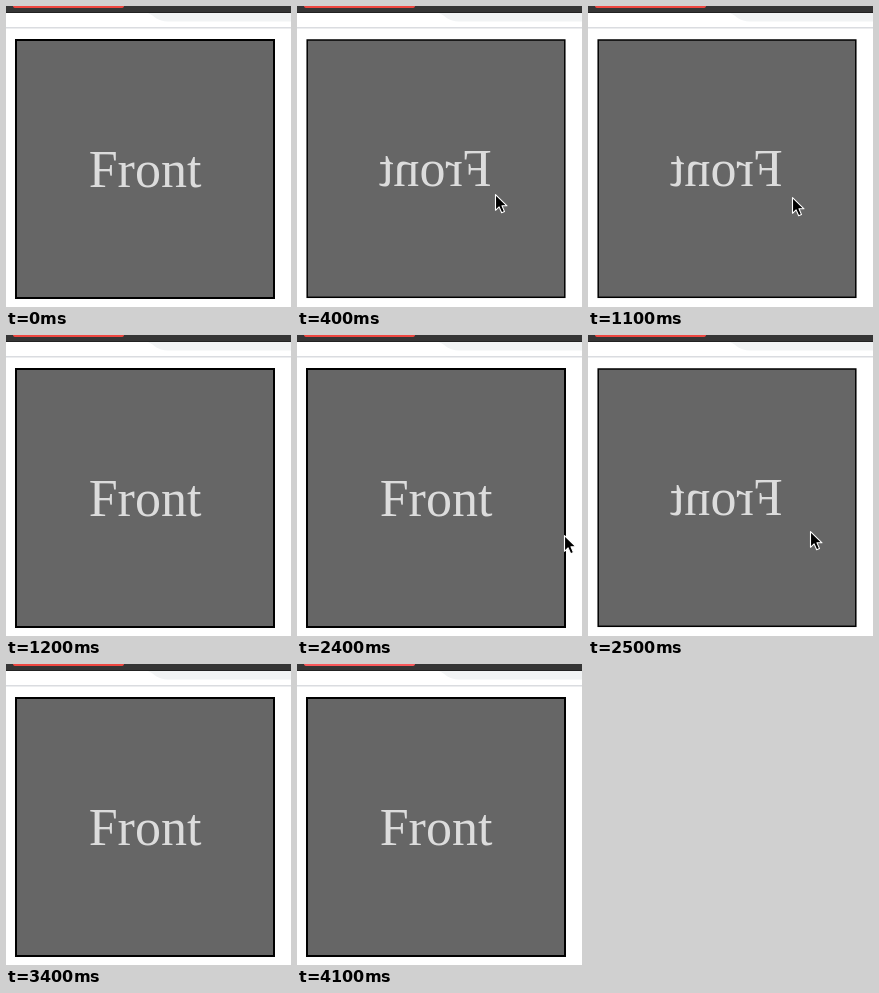
Write an HTML page that moves like this. It is 285 px wide and 301 px high and loops after 4500 ms.

```html
<!DOCTYPE html>
<html lang="en">
<head>
<meta charset="utf-8">
<title>Card flip</title>
<style>
  html, body { margin: 0; width: 100%; height: 100%; overflow: hidden; background: #fff; }
  svg { display: block; width: 285px; height: 301px; }
  text { font: 52px "Liberation Serif", "Times New Roman", serif; fill: #dcdcdc; text-anchor: middle; }
</style>
</head>
<body>
<svg viewBox="0 0 285 301">
  <path d="M142 7C149 10 151 15.500 162 15.500H285V7Z" fill="#f1f3f4"/>
  <rect width="285" height="7" fill="#353535"/>
  <rect y="6" width="285" height="1" fill="#222"/>
  <path id="tab" d="M7 0H118Q118 2 115 2H10Q7 2 7 0Z"/>
  <rect y="21" width="285" height="1.500" fill="#dadce0"/>
  <rect id="face" fill="#666" stroke="#000"/>
  <text id="label" x="139" y="181">Front</text>
  <path id="cursor" d="M.5 .7V16.300L4.100 12.900L6.700 18.800L9.500 17.600L7 11.800H12Z"
        fill="#000" stroke="#fff" stroke-width="1.100" stroke-linejoin="round"/>
</svg>
<script>
const LOOP = 4500;
// start time, flipped, pointer tip
const poses = [
  [0, false],
  [400, true, [198, 188]],
  [500, true, [201, 190]],
  [1100, true, [204, 191]],
  [1200, false],
  [2400, false, [267, 200]],
  [2500, true, [222, 196]],
  [3300, true],
  [3400, false]
];
const [tab, face, label, cursor] =
  ["tab", "face", "label", "cursor"].map(id => document.getElementById(id));

function set(el, attrs) {
  for (const name in attrs) el.setAttribute(name, attrs[name]);
}

function draw(ms) {
  const t = ms % LOOP;
  const [, flipped, tip] = poses.findLast(p => p[0] <= t);
  set(face, flipped
    ? { x: 10.2, y: 34, width: 257.6, height: 257.3, "stroke-width": 1.5 }
    : { x: 10, y: 34, width: 258, height: 258, "stroke-width": 2 });
  set(label, { transform: flipped ? "translate(277.4 -.6) scale(-1 1)" : "" });
  set(cursor, {
    visibility: tip ? "visible" : "hidden",
    transform: tip ? `translate(${tip})` : ""
  });
  set(tab, { fill: t < 4100 ? "#ee4640" : "#f9575a" });
}

const start = performance.now();
function tick() {
  draw(performance.now() - start);
  requestAnimationFrame(tick);
}
tick();
</script>
</body>
</html>
```
